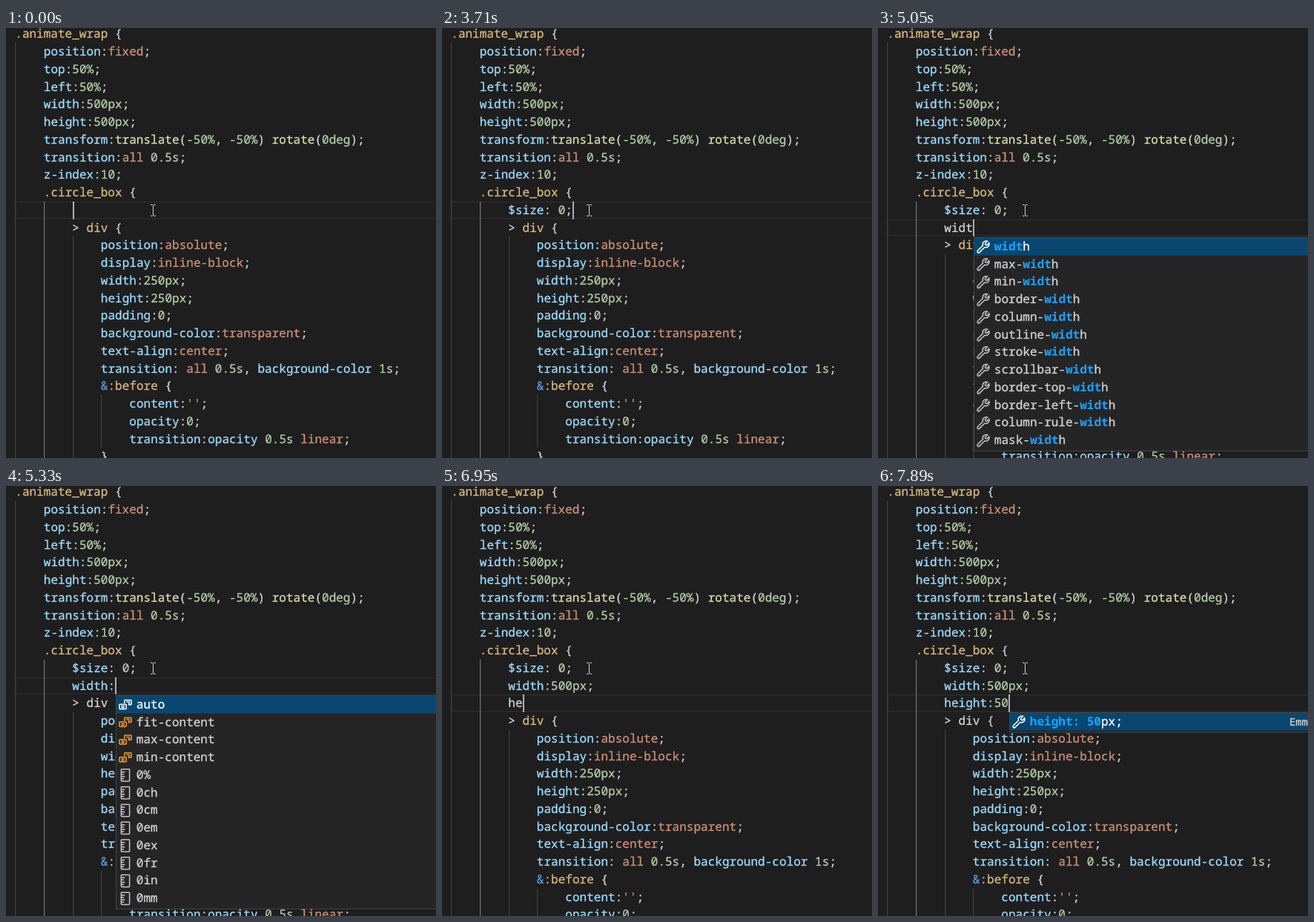
These frames come from a looping animation (580 by 580 pixels, 7.99 s). An HTML page:

```html
<!DOCTYPE html>
<html lang="en">
<head>
<meta charset="utf-8">
<title>Typing SCSS in an editor</title>
<style>
html, body { margin: 0; width: 100%; height: 100%; overflow: hidden; background: #1e1e1e; }
svg { display: block; width: 100vw; height: 100vh; }
text {
  font: 16.05px "Noto Sans Mono", "DejaVu Sans Mono", monospace;
  white-space: pre;
  text-rendering: geometricPrecision;
}
text, tspan { fill: currentColor; stroke: currentColor; stroke-width: 0.3; }
.detail { font-size: 13.8px; }
.match { color: #18a3ff; font-weight: 700; stroke: none; }
</style>
</head>
<body>
<svg id="stage" viewBox="0 0 580 580"></svg>
<script>
const LOOP = 7990;
const CHAR = 9.63, LEFT = 12.48, ROW = 23.75, BASELINE = 17;
const TYPED_ROW = 10, TYPED_COL = 8;
const COLOR = {
  plain: '#d4d4d4', selector: '#d7ba7d', prop: '#9cdcfe', number: '#b5cea8',
  word: '#ce9178', fn: '#dcdcaa', parent: '#569cd6'
};

const before = `.animate_wrap {
    position:fixed;
    top:50%;
    left:50%;
    width:500px;
    height:500px;
    transform:translate(-50%, -50%) rotate(0deg);
    transition:all 0.5s;
    z-index:10;
    .circle_box {`.split('\n');

const after = `        > div {
            position:absolute;
            display:inline-block;
            width:250px;
            height:250px;
            padding:0;
            background-color:transparent;
            text-align:center;
            transition: all 0.5s, background-color 1s;
            &:before {
                content:'';
                opacity:0;
                transition:opacity 0.5s linear;
            }`.split('\n');

const finished = ['$size: 0;', 'width:500px;'];

// Suggestion lists: rows of icon, label, matched part, detail.
const emmet = (label, match) => [{ icon: 'wrench', label, match, detail: 'Emmet Abbreviation' }];
const list = (icon, names, match) => names.split(' ').map(label => ({ icon, label, match }));
const widths = match => list('wrench', 'width max-width min-width border-width column-width ' +
  'outline-width stroke-width scrollbar-width border-top-width border-left-width ' +
  'column-rule-width mask-width', match);
const heights = match => list('wrench', 'height max-height min-height line-height', match);
const sizes = [
  ...list('value', 'auto fit-content max-content min-content'),
  ...list('unit', '0% 0ch 0cm 0em 0ex 0fr 0in 0mm')
];
const lengths = [...emmet('width: 500%;', 'width: 500'), ...list('unit', '500pc 500pt 500px', '500p')];

// Time, typed line, its text, then: open = value not yet closed, popup, popupCol, caret.
const steps = [
  [0, 0, ''],
  [430, 0, '', { caret: false }],
  [980, 0, ''],
  [1380, 0, '', { caret: false }],
  [1590, 0, '$'],
  [1860, 0, '$s'],
  [1950, 0, '$si'],
  [2260, 0, '$siz'],
  [2460, 0, '$size'],
  [2700, 0, '$size:'],
  [2810, 0, '$size:', { open: true, popup: emmet('$size: ;', '$size:') }],
  [3160, 0, '$size: ', { open: true }],
  [3490, 0, '$size: 0', { open: true }],
  [3640, 0, '$size: 0;', { open: true }],
  [3710, 0, '$size: 0;'],
  [4090, 1, ''],
  [4560, 1, 'w'],
  [4700, 1, 'wid'],
  [4790, 1, 'wid', { popup: widths('wid') }],
  [5050, 1, 'widt', { popup: widths('widt') }],
  [5110, 1, 'width', { popup: widths('width') }],
  [5250, 1, 'width:', { popup: widths('width'), popupCol: 5 }],
  [5330, 1, 'width:', { open: true, popup: sizes }],
  [5690, 1, 'width:5', { open: true, popup: emmet('width: 5px;', 'width: 5') }],
  [5770, 1, 'width:50', { open: true, popup: emmet('width: 50px;', 'width: 50') }],
  [5930, 1, 'width:500', { open: true, popup: emmet('width: 500px;', 'width: 500') }],
  [6070, 1, 'width:500p', { open: true, popup: lengths }],
  [6150, 1, 'width:500px', { open: true, popup: emmet('width: 500px;', 'width: 500px') }],
  [6230, 1, 'width:500px;', { open: true }],
  [6310, 1, 'width:500px;'],
  [6550, 2, ''],
  [6860, 2, 'h'],
  [6950, 2, 'he'],
  [7120, 2, 'hei'],
  [7200, 2, 'heig', { popup: heights('heig') }],
  [7290, 2, 'heigh', { popup: heights('heigh') }],
  [7370, 2, 'height', { popup: heights('height') }],
  [7450, 2, 'height:', { popup: heights('height'), popupCol: 6 }],
  [7530, 2, 'height:', { open: true, popup: sizes }],
  [7890, 2, 'height:50', { open: true, popup: emmet('height: 50px;', 'height: 50') }]
];

const esc = s => s.replace(/&/g, '&amp;').replace(/</g, '&lt;');
const rowTop = row => Math.ceil(-3.5 + row * ROW - 0.5);
const colX = col => LEFT + col * CHAR;
const caretX = col => Math.floor(colX(col) + 0.6);
const rect = (x, y, w, h, fill, extra = '') =>
  `<rect x="${x}" y="${y}" width="${w}" height="${h}" fill="${fill}" ${extra}/>`;
const span = (kind, s) => `<tspan color="${COLOR[kind]}">${esc(s)}</tspan>`;

function highlight(text, open) {
  if (text.endsWith('{')) {
    return text.replace(/[&>{]|[^&>{]+/g, s => {
      if (s === '&') return span('parent', s);
      return span(/[>{]/.test(s) || (open && s.includes('div')) ? 'plain' : 'selector', s);
    });
  }
  const [, name, colon, value] = text.match(/^([$\w-]*)(:?)(.*)$/);
  const known = colon || /^(\$\w+|width|height)$/.test(name);
  const token = /(-?\d[\w.%]*)|([\w-]+)(?=\()|(opacity|background-color)|([\w-]+|'')|[^\w'-]+/g;
  const parts = value.replace(token, (s, number, fn, prop, word) =>
    span(number ? 'number' : fn ? 'fn' : prop ? 'prop' : word ? 'word' : 'plain', s));
  return span(known ? 'prop' : 'plain', name) + span('plain', colon) + parts;
}

function drawLine(line, row, open) {
  const text = line.trimStart(), indent = line.length - text.length;
  const y = rowTop(row);
  let out = '';
  for (let col = 0; col < indent; col += 4) {
    const active = col === 4 && row >= TYPED_ROW;
    out += rect(Math.round(colX(col)), y, 1.25, rowTop(row + 1) - y, active ? '#707070' : '#404040');
  }
  return out + `<text x="${colX(indent) - 0.2}" y="${y + BASELINE}">${highlight(text, open)}</text>`;
}

// Icons on a 16-unit grid.
const icons = {
  value: ['#ee9d28', 'M7 6.5V3.5l.5-.5h6.5l.5.5v4l-.5.5h-3M9 5h4M2 7.5h6.5l.5.5v4l-.5.5H2l-.5-.5V8zM3.5 9.3h3.5M3.5 11h3.5M11 6.5h2'],
  unit: ['#c5c5c5', 'M4 1.5h8l.5.5v12l-.5.5H4l-.5-.5V2zM4 4.5h3.5M4 7h2.5M4 9.5h3.5M4 12h2.5'],
  wrench: ['#c5c5c5', 'M2 12.2L7.6 6.7A3.7 3.7 0 0 1 12.4 2L10 4.4l.3 1.5 1.6.4L14.2 4A3.7 3.7 0 0 1 9.4 8.6L3.9 14.1A1.3 1.3 0 0 1 2 12.2z']
};

function drawPopup(rows, x, y) {
  let out = rect(x + 0.5, y + 0.5, 536, rows.length * ROW + 3, '#252526', 'stroke="#454545"');
  rows.forEach(({ icon, label, match, detail }, i) => {
    const top = y + 1 + i * ROW, selected = i === 0;
    const color = selected ? '#ffffff' : COLOR.plain;
    const [tint, path] = icons[icon];
    const at = match ? label.indexOf(match) : -1;
    const body = at < 0 ? esc(label) : esc(label.slice(0, at)) +
      `<tspan class="match">${esc(match)}</tspan>` + esc(label.slice(at + match.length));
    const baseline = Math.round(top + BASELINE - 0.25);
    if (selected) out += rect(x + 1, top, 535, ROW, '#094771');
    out += `<path transform="translate(${x + 3} ${top + 2}) scale(1.25)" d="${path}" fill="none"
      stroke="${selected ? '#ffffff' : tint}" stroke-width="1.2"/>`;
    out += `<text x="${x + 27.8}" y="${baseline}" color="${color}">${body}</text>`;
    if (detail) {
      out += `<text class="detail" x="${x + 378}" y="${baseline}" color="${COLOR.plain}">${detail}</text>`;
    }
  });
  return out;
}

const pointer = '<path d="M195 238.5h2.5l1 1 1-1h2.5M198.5 239v14M195 253.5h2.5l1-1 1 1h2.5" ' +
  'fill="none" stroke="#d4d4d4"/>';

function draw([, line, text, { open, popup, popupCol = text.length, caret = true } = {}]) {
  const row = TYPED_ROW + line, top = rowTop(row), bottom = rowTop(row + 1);
  const pad = ' '.repeat(TYPED_COL);
  const typed = [...finished.slice(0, line), text].map(s => pad + s);
  const lines = [...before, ...typed, ...after];
  let out = rect(13, top + 1, 700, bottom - top - 2, 'none', 'stroke="#282828" stroke-width="2"');
  out += lines.map((s, i) => drawLine(s, i, open)).join('');
  if (caret) out += rect(caretX(TYPED_COL + text.length), top, 2, bottom - top, '#aeafad');
  if (popup) out += drawPopup(popup, caretX(TYPED_COL + popupCol) + 1, Math.round(-3.5 + (row + 1) * ROW));
  return out + pointer;
}

const stage = document.getElementById('stage');
const start = performance.now();
let shown = -1;

function tick() {
  const time = (performance.now() - start) % LOOP;
  const index = steps.findLastIndex(step => step[0] <= time);
  if (index !== shown) stage.innerHTML = draw(steps[shown = index]);
  requestAnimationFrame(tick);
}
tick();
</script>
</body>
</html>
```
